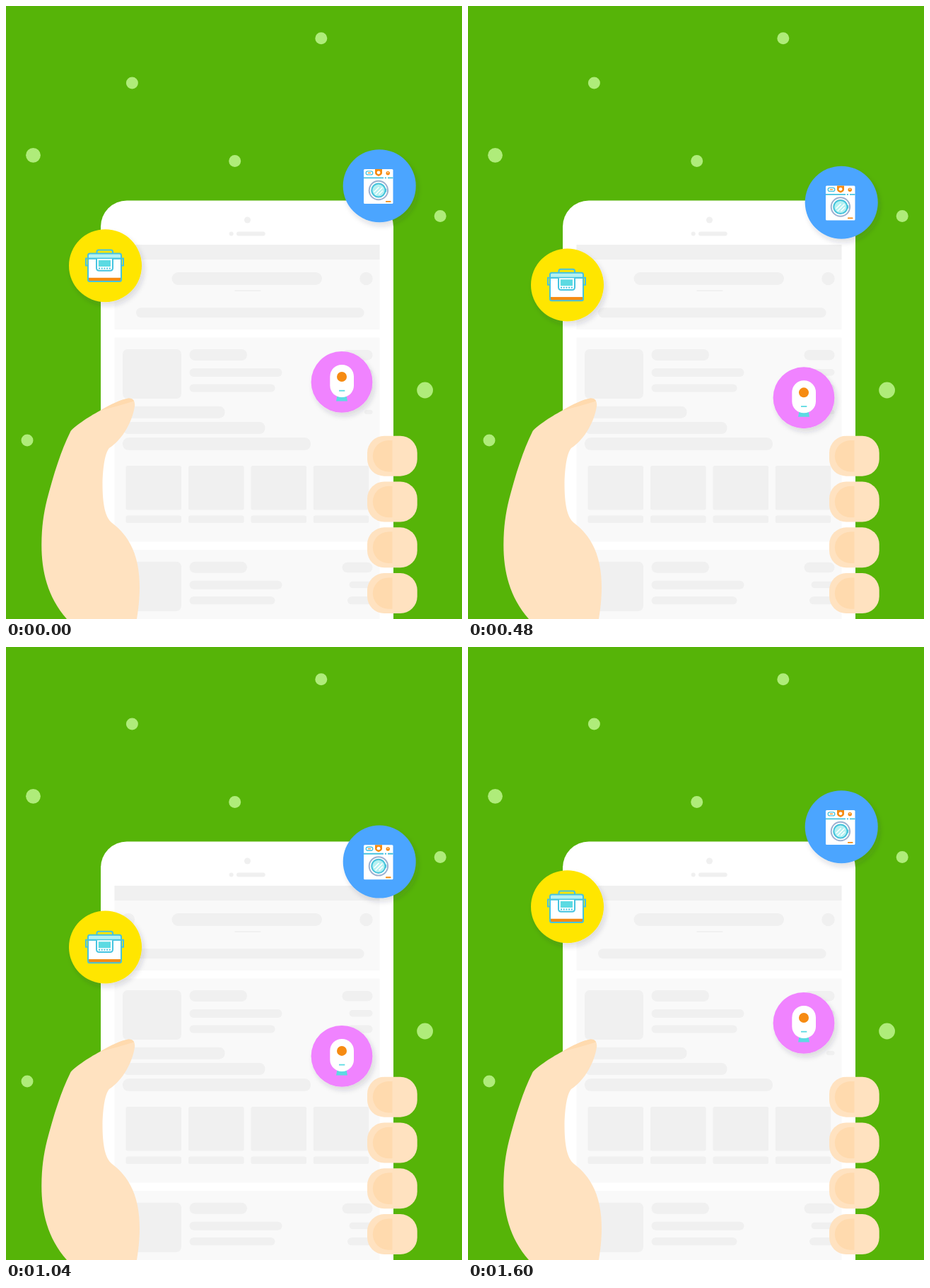
These frames come from a looping animation (645 px wide and 868 px high, 2200 ms). An HTML page:

```html
<!DOCTYPE html>
<html lang="en">
<head>
<meta charset="utf-8">
<title>Phone in hand</title>
<style>
  html, body { margin: 0; width: 100%; height: 100%; overflow: hidden; background: #56b408; }
  svg { display: block; width: 645px; height: 868px; }
  .dots { fill: #afec7a; }
  .block { fill: #f0f0f0; }
  .card { fill: #f9f9f9; }
  .skin { fill: #ffe2c0; }
  .shade { fill: #ffdaae; }
  .badge { filter: url(#shadow); }
  .line { fill: none; stroke: #45c3e0; stroke-width: 2; }
  .cyan { fill: #5cdae2; }
  .pale { fill: #b5f1f1; }
  .orange { fill: #f68b12; }
  .white { fill: #fff; }
</style>
</head>
<body>
<svg viewBox="0 0 645 868">
  <defs>
    <filter id="shadow" x="-20%" y="-20%" width="145%" height="145%">
      <feDropShadow dx="3" dy="5" stdDeviation="3.5" flood-color="#334" flood-opacity=".15"/>
    </filter>
    <g id="entry">
      <rect x="165" y="486" width="83" height="70" rx="7"/>
      <rect x="259.5" y="486" width="81.5" height="16" rx="8"/>
      <rect x="259.5" y="513" width="131" height="12" rx="6"/>
      <rect x="259.5" y="535.5" width="121" height="11" rx="5.5"/>
      <rect x="475.5" y="487" width="43" height="14.5" rx="7.2"/>
      <rect x="485.5" y="514" width="33" height="9.5" rx="4.7"/>
      <rect x="483" y="535.5" width="35.5" height="11" rx="5.5"/>
    </g>
    <g id="tile">
      <rect x="169.5" y="651" width="78.5" height="62.5" rx="2.5"/>
      <rect x="169.5" y="721.5" width="78.5" height="10.5" rx="2.5"/>
    </g>
    <g id="finger">
      <rect class="skin" x="511" y="608.7" width="70.7" height="57" rx="24"/>
      <path class="shade" d="M546.5 615h-5.500a22.200 22.200 0 0 0 0 44.400h5.500z"/>
    </g>
  </defs>

  <rect width="645" height="868" fill="#56b408"/>
  <g class="dots">
    <circle cx="445.800" cy="45.800" r="8.500"/>
    <circle cx="178.400" cy="109" r="8.500"/>
    <circle cx="38.500" cy="211.300" r="10.400"/>
    <circle cx="323.700" cy="219.600" r="8.500"/>
    <circle cx="614.200" cy="297.500" r="8.500"/>
    <circle cx="592.600" cy="544" r="11.400"/>
    <circle cx="30" cy="615" r="8.500"/>
  </g>

  <rect class="white" x="134" y="275.500" width="414" height="640" rx="37"/>
  <g class="block">
    <circle cx="341.500" cy="303" r="4.500"/>
    <circle cx="318.700" cy="322.500" r="3"/>
    <rect x="326" y="319.500" width="40.700" height="6" rx="3"/>
  </g>
  <g class="card">
    <rect x="153.500" y="338" width="375" height="120"/>
    <rect x="153.500" y="469.500" width="375" height="289"/>
    <rect x="153.500" y="770" width="375" height="98"/>
  </g>
  <g class="block">
    <rect x="153.500" y="338" width="375" height="21"/>
    <circle cx="173" cy="386" r="9.200"/>
    <rect x="234.500" y="377" width="212.500" height="18" rx="9"/>
    <circle cx="509.500" cy="386" r="9.200"/>
    <rect x="323.500" y="402.300" width="37" height="1.700"/>
    <rect x="184" y="427.300" width="322.500" height="14" rx="7"/>
    <use href="#entry"/>
    <use href="#entry" y="300.800"/>
    <rect x="507" y="572" width="11.500" height="6" rx="3"/>
    <rect x="165" y="566.700" width="144.500" height="17" rx="8"/>
    <rect x="165" y="589" width="201.500" height="17" rx="8"/>
    <rect x="165" y="611.300" width="266" height="17.500" rx="8"/>
    <use href="#tile"/>
    <use href="#tile" x="88.600"/>
    <use href="#tile" x="177"/>
    <use href="#tile" x="265.200"/>
  </g>

  <path class="skin" d="M86 868C58 836 50 798 50.300 762C50.500 738 53 719 58 699C67 664 78 629 91 603C94 597 116 582 133 573C148 564 162 557.500 173 555.500C180 554.800 183 560 182 567C179 587 166 613 146 626C140 633 137 653 136.500 676C136.500 705 140 724 150 732C178 753 189 784 189 823C189 840 187 856 185 868z"/>
  <path class="shade" d="M133 573C148 564 162 557.500 173 555.500C177 555.100 179.800 556.500 181 559.500C166 564 149 569 133 573z"/>
  <use href="#finger"/>
  <use href="#finger" y="64.800"/>
  <use href="#finger" y="129.600"/>
  <use href="#finger" y="194.400"/>

  <g class="mover" data-drop="50">
    <circle class="badge" cx="528.200" cy="254.700" r="51.500" fill="#4ca5ff"/>
    <rect class="white" x="506" y="231" width="41.500" height="49" rx="1.500"/>
    <rect class="line" x="509.200" y="233.900" width="9.600" height="5" rx="2.500" stroke-width="1.300" style="stroke-width:1.300px"/>
    <rect class="orange" x="512" y="235.800" width="4" height="1.200"/>
    <path class="orange" d="M522 231h10v5.500q0 2.500-5 4.500q-5-2-5-4.500z"/>
    <circle class="white" cx="527" cy="235.800" r="2.400"/>
    <circle class="orange" cx="540.200" cy="236.700" r="2.700"/>
    <circle class="white" cx="540.200" cy="235.900" r=".8"/>
    <path class="line" d="M506 243.400h28m1.800 0h2.200m2 0h7.500" style="stroke-width:1.800px"/>
    <circle cx="526.900" cy="261" r="13.200" fill="#fff" stroke="#9db1d0" stroke-width="2"/>
    <circle class="pale" cx="526.900" cy="261" r="9.600" stroke="#45c3dc" stroke-width="2"/>
    <path d="M520.500 263.500l7-7M522.500 267l10-10M527.500 267l5.500-5.500" stroke="#fff" stroke-width="1.500"/>
    <rect x="536.200" y="258.500" width="2" height="5" rx="1" fill="#45c3dc"/>
    <rect class="orange" x="537" y="276" width="7.500" height="1.800" rx=".6"/>
  </g>

  <g class="mover" data-drop="58">
    <circle class="badge" cx="140.500" cy="367.700" r="51.500" fill="#ffe600"/>
    <path class="line" d="M128.500 350v-2q0-2.500 2.500-2.500h17.500q2.500 0 2.500 2.500v2M116 357.500h-3v10h3M163 357.500h3v10h-3"/>
    <path class="white" d="M116 357.500h47v30q0 2.500-2.500 2.500h-42q-2.500 0-2.500-2.500z"/>
    <rect class="orange" x="116.500" y="384.800" width="46" height="5"/>
    <path class="line" d="M116 357.500h47v30q0 2.500-2.500 2.500h-42q-2.500 0-2.500-2.500z"/>
    <path class="line pale" d="M116 357.500v-4.500q0-2.500 2.500-2.500h42q2.500 0 2.500 2.500v4.500z" style="fill:#b5f1f1"/>
    <path class="line" d="M128 358v13q0 3.800 3.800 3.800h15.400q3.800 0 3.800-3.800v-13" style="fill:#fff"/>
    <rect class="cyan" x="130.800" y="360" width="17.200" height="9"/>
    <path class="line" d="M131 371.500h17" stroke-dasharray="2 1.700"/>
  </g>

  <g class="mover" data-drop="47.5">
    <circle class="badge" cx="475" cy="532.400" r="43.400" fill="#f083ff"/>
    <path class="cyan" d="M468.500 552h13l1.500 7.500h-16z"/>
    <rect class="white" x="458.300" y="508" width="33.700" height="46" rx="16.500"/>
    <circle class="orange" cx="475" cy="525" r="7"/>
    <rect class="cyan" x="471" y="543.800" width="8.300" height="1.800"/>
  </g>
</svg>
<script>
  const LOOP = 2200, STEP = 40, LOW = 1000, BACK = 1600;
  const movers = [...document.querySelectorAll('.mover')];
  const ease = u => u * u * (3 - 2 * u);

  // Eased fall, quicker eased rise, then a rest until the loop restarts.
  function fall(t) {
    if (t < LOW) return ease(t / LOW);
    if (t < BACK) return 1 - ease((t - LOW) / (BACK - LOW));
    return 0;
  }

  function draw() {
    const t = Math.floor(performance.now() % LOOP / STEP) * STEP;
    for (const m of movers) {
      m.setAttribute('transform', `translate(0 ${(m.dataset.drop * fall(t)).toFixed(2)})`);
    }
    requestAnimationFrame(draw);
  }
  draw();
</script>
</body>
</html>
```
